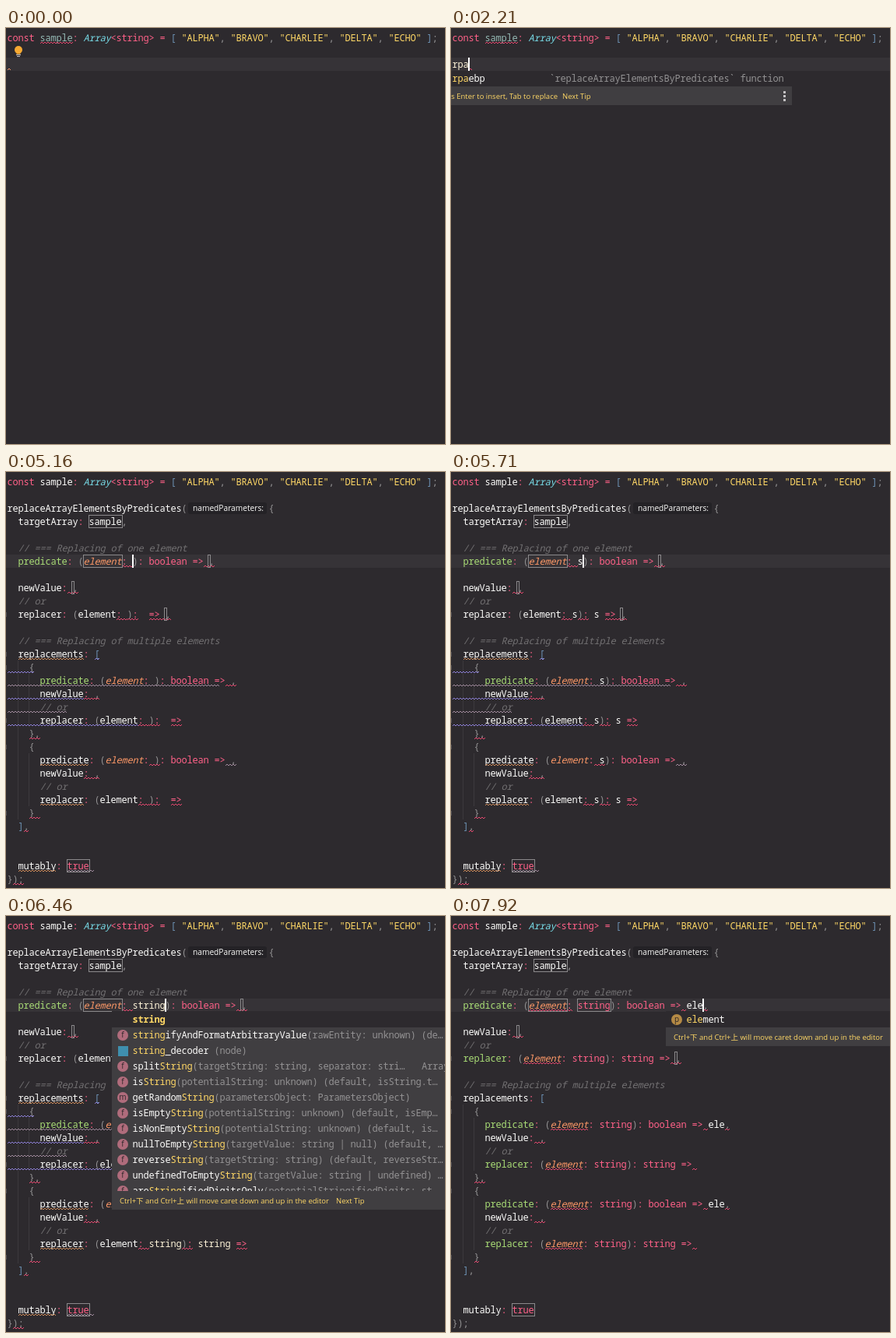
An HTML page with a canvas for the animation above (7.99 s loop, 564 by 534 pixels).

```html
<!DOCTYPE html>
<html lang="en">
<head>
<meta charset="utf-8">
<title>Live template demo</title>
<style>
  html, body { margin: 0; width: 100%; height: 100%; overflow: hidden; background: #2d2a2e; }
  canvas { display: block; }
</style>
</head>
<body>
<canvas id="stage" width="564" height="534"></canvas>
<script>
const LOOP = 7990, CELL = 7, LINE = 17;
const ctx = document.getElementById('stage').getContext('2d');
const MONO = '12px "Noto Sans Mono", "DejaVu Sans Mono", monospace';
const SANS = '"Open Sans", "Noto Sans", "Noto Sans CJK JP", sans-serif';
const HINT = '9.5px ' + SANS;
const C = {
  bg: '#2d2a2e', line: '#363337', panel: '#403e41', white: '#fcfcfa', cream: '#fdf3d8',
  grey: '#939293', comment: '#727072', pink: '#ff6188', yellow: '#ffd866', green: '#a9dc76',
  orange: '#fc9867', cyan: '#78dce8', blue: '#6d92b4', unused: '#94b8b3', box: '#8b898b',
  selection: '#5b595c', guide: '#3c393d', red: '#e8486f', purple: '#8c7fd6', dusk: '#a08a9c', amber: '#cf8d5c'
};

const colX = col => 1 + col * CELL;
const rowY = row => 4 + row * LINE;

function rect(x, y, w, h, color) {
  ctx.fillStyle = color;
  ctx.fillRect(x, y, w, h);
}

function write(text, x, y, color, font = MONO, align = 'left') {
  ctx.font = font;
  ctx.letterSpacing = font.endsWith(MONO) ? '-0.2px' : '0px';
  ctx.textAlign = align;
  ctx.fillStyle = color;
  ctx.fillText(text, x, y);
}

// Draws [text, color] pairs one after another on the monospace grid.
function writeParts(x, y, parts, font = MONO) {
  for (const [text, color] of parts) {
    write(text, x, y, color, font);
    x += text.length * CELL;
  }
}

const writeCode = (text, row, col, color, font) =>
  write(text, colX(col) + .6, rowY(row) + 13, color, font);

// An empty template field still shows as a narrow box.
function box(row, col, length) {
  const x = colX(col) + (length ? .5 : -.5);
  ctx.strokeStyle = C.box;
  ctx.lineWidth = 1;
  ctx.strokeRect(x, rowY(row) + .5, length ? length * CELL + 1 : 3, LINE - 1);
}

function wave(row, from, to, color = C.red) {
  const bottom = rowY(row) + LINE - 1, end = colX(to) + 1;
  ctx.strokeStyle = color;
  ctx.lineWidth = 1;
  ctx.beginPath();
  for (let x = colX(from) + 1, up = 0; x <= end; x += 2, up ^= 1) ctx.lineTo(x, bottom - up * 2);
  ctx.stroke();
}

// Returns [color, italic] of one token.
function tokenStyle(token, row, s) {
  if (token.startsWith('//')) return [C.comment, true];
  if (token[0] === '"') return [C.yellow];
  if (row === 0 && token === 'sample') return [s.analysed ? C.white : C.unused];
  if (token === 'Array') return [C.cyan, true];
  if (token === 'string') return [row === 0 || s.resolved ? C.pink : C.cream];
  if (/^(const|boolean|true|=>|[:<>=])$/.test(token)) return [C.pink];
  if (token === 'predicate' && (s.resolved || s.analysed && row < 20)) return [C.green];
  if (token === 'replacer' && s.resolved) return [C.green];
  if (token === 'element' && (s.resolved || s.analysed && [6, 15, 21].includes(row))) return [C.orange, true];
  if (/^[[\]]$/.test(token)) return [C.blue];
  return [/^\w/.test(token) ? C.white : C.grey];
}

function codeLine(row, text, s) {
  for (const m of text.matchAll(/\/\/.*|"[^"]*"|\w+|=>|\S/g)) {
    const [color, italic] = tokenStyle(m[0], row, s);
    writeCode(m[0], row, m.index, color, (italic ? 'italic ' : '') + MONO);
  }
}

function snippetLines(s) {
  const predicate = `predicate: (element: ${s.type}): boolean => ${s.body},`;
  const replacer = `replacer: (element: ${s.type}): ${s.type} => `;
  const lines = {
    2: 'replaceArrayElementsByPredicates(' + ' '.repeat(s.analysed ? 15 : 0) + '{',
    3: '  targetArray: sample,',
    5: '  // === Replacing of one element',
    6: '  ' + predicate,
    8: '  newValue: ,',
    9: '  // or',
    10: '  ' + replacer + ',',
    12: '  // === Replacing of multiple elements',
    13: '  replacements: [',
    26: '  ],',
    29: '  mutably: true',
    30: '});'
  };
  for (const row of [14, 20]) {
    ['    {', '      ' + predicate, '      newValue: ,', '      // or', '      ' + replacer, row < 20 ? '    },' : '    }']
      .forEach((text, i) => lines[row + i] = text);
  }
  return lines;
}

function firstWarnings(n) {
  wave(6, 21, 23); wave(6, 36 + n, 38 + n);
  wave(8, 11, 13);
  wave(10, 20, 22); wave(10, 22 + n, 24 + n); wave(10, 26 + 2 * n, 30 + 2 * n);
  wave(13, 2, 14, C.amber); wave(13, 16, 17, C.purple);
  wave(14, 0, 5, C.purple);
  wave(15, 0, 39 + n, C.dusk); wave(15, 40 + n, 42 + n);
  wave(16, 0, 14, C.purple); wave(16, 14, 17);
  wave(17, 0, 11, C.dusk);
  wave(18, 0, 24, C.purple); wave(18, 24, 26); wave(18, 26 + n, 28 + n); wave(18, 30 + 2 * n, 32 + 2 * n);
  wave(19, 4, 6);
  wave(21, 6, 15, C.amber); wave(21, 26, 28); wave(21, 40 + n, 42 + n, C.dusk);
  wave(22, 14, 17);
  wave(24, 6, 14, C.amber); wave(24, 24, 26); wave(24, 26 + n, 28 + n); wave(24, 30 + 2 * n, 32 + 2 * n);
  wave(25, 4, 6);
  wave(26, 3, 4);
  wave(29, 2, 9, C.amber); wave(29, 11, 16, C.dusk);
  wave(30, 1, 3);
}

function finalWarnings(b) {
  wave(6, 14, 22); wave(6, 42, 43); wave(6, 43 + b, 44 + b);
  wave(8, 11, 13);
  wave(10, 13, 20); wave(10, 40, 42);
  for (const row of [15, 21]) {
    wave(row, 18, 25); wave(row, 46, 47); wave(row, 47 + b, 48 + b);
    wave(row + 1, 15, 17);
    wave(row + 3, 17, 24); wave(row + 3, 44, 45);
    wave(row + 4, 4, row < 20 ? 6 : 5);
  }
}

function inlayHint() {
  ctx.fillStyle = '#242226';
  ctx.beginPath();
  ctx.roundRect(234, 39, 101, 15, 3);
  ctx.fill();
  write('namedParameters:', 240, 50, C.white, '10.2px ' + SANS);
}

function guides() {
  rect(15, rowY(14), 1, LINE * 12, C.guide);
  for (const row of [15, 21]) rect(29, rowY(row), 1, LINE * 4, C.guide);
  for (const row of [10, 13, 14, 18, 20, 25]) rect(0, rowY(row) + 6, 1, 6, '#514e52');
}

function bulb() {
  ctx.fillStyle = '#f5a932';
  ctx.beginPath();
  ctx.arc(16, 28, 5, 0, 7);
  ctx.fill();
  rect(13.5, 31, 5, 2.5, '#f5a932');
  rect(13, 34, 6, 1, '#c4c2c4');
  rect(14, 36, 4, 1, '#c4c2c4');
}

function badge(x, y, letter, color) {
  ctx.fillStyle = color;
  ctx.beginPath();
  ctx.arc(x, y, 7, 0, 7);
  ctx.fill();
  write(letter, x, y + 3, '#2b2528', '10px ' + SANS, 'center');
}

function hintBar(x, y, w, text, nextX) {
  rect(x, y, w, 24, C.panel);
  write(text, x + 10, y + 16, C.yellow, HINT);
  if (nextX) write('Next Tip', nextX, y + 16, C.yellow, HINT);
}

// Splits a completion into its typed and remaining part.
const completion = (word, typed) => [[typed, C.yellow], [word.slice(typed.length), C.white]];

function templatePopup(typed) {
  rect(0, 55, 438, 20, C.bg);
  writeParts(1.6, 69, completion('rpaebp', typed));
  write('`replaceArrayElementsByPredicates` function', 126.6, 69, C.grey);
  rect(0, 75, 438, 24, C.panel);
  write('Press Enter to insert, Tab to replace', 137, 91, C.yellow, HINT, 'right');
  write('Next Tip', 143, 91, C.yellow, HINT);
  for (const y of [81, 86, 91]) rect(427, y, 3, 3, '#c4c2c4');
}

function keywordRow(typed) {
  rect(136, 122, 428, 21, C.bg);
  writeParts(162.4, 137, completion('string', typed), 'bold ' + MONO);
}

function typePopup(typed) {
  keywordRow(typed);
  hintBar(136, 143, 428, 'Press Ctrl+. to choose the selected (or first) suggestion and insert a dot afterwards', 508);
}

const MOVE_TIP = 'Ctrl+下 and Ctrl+上 will move caret down and up in the editor';

// Each entry: text before the match, match, text after it, signature.
const SUGGESTIONS = [
  ['', 'string', 'ifyAndFormatArbitraryValue', '(rawEntity: unknown) (de…'],
  ['', 'string', '_decoder', ' (node)'],
  ['split', 'String', '', '(targetString: string, separator: stri…'],
  ['is', 'String', '', '(potentialString: unknown) (default, isString.t…'],
  ['getRandom', 'String', '', '(parametersObject: ParametersObject)'],
  ['isEmpty', 'String', '', '(potentialString: unknown) (default, isEmp…'],
  ['isNonEmpty', 'String', '', '(potentialString: unknown) (default, is…'],
  ['nullToEmpty', 'String', '', '(targetValue: string | null) (default, …'],
  ['reverse', 'String', '', '(targetString: string) (default, reverseStr…'],
  ['undefinedToEmpty', 'String', '', '(targetValue: string | undefined) …'],
  ['are', 'String', 'ifiedDigitsOnly', '(potentialStringifiedDigits: st…']
];

function listPopup() {
  rect(136, 122, 428, 255, C.panel);
  keywordRow('string');
  ctx.save();
  ctx.beginPath();
  ctx.rect(136, 123, 428, 230);
  ctx.clip();
  SUGGESTIONS.forEach(([before, match, after, signature], i) => {
    const y = 153 + i * 20;
    if (i === 1) rect(144, y - 6, 13, 13, '#3f8fae');
    else badge(150, y, i === 4 ? 'm' : 'f', '#b06c7c');
    writeParts(162.4, y + 4, [[before, C.white], [match, C.yellow], [after, C.white], [signature, C.grey]]);
  });
  write('Array', 534, 197, C.grey);
  ctx.restore();
  hintBar(136, 353, 428, MOVE_TIP, 424);
}

function elementPopup(typed) {
  rect(276, 122, 288, 21, C.bg);
  badge(290, 133, 'p', '#b58a45');
  writeParts(302.4, 137, completion('element', typed));
  hintBar(276, 143, 288, MOVE_TIP);
}

const typedAt = (word, times, t) => word.slice(0, times.filter(time => t >= time).length);

function caretAt(t, s) {
  if (t < 1820) return null;
  if (t < 2700) return [2, s.trigger.length];
  if (t < 4340) return t < 3890 ? [3, 21] : null;
  if (t < 5160) return [6, 21];
  return [6, t < 7080 ? 23 + s.type.length : 43 + s.body.length];
}

function drawSnippet(t, s) {
  const n = s.type.length, b = s.body.length;
  guides();
  if (t < 4340) rect(colX(15) + 1, rowY(3), 42, LINE, C.selection);
  else if (t < 5160) rect(colX(14) + 1, rowY(6), 49, LINE, C.selection);
  for (const [row, text] of Object.entries(snippetLines(s))) codeLine(+row, text, s);
  if (t < 4340) writeCode('sample', 3, 15, C.yellow);
  if (s.analysed) inlayHint();
  if (s.resolved) finalWarnings(b);
  else if (s.analysed) firstWarnings(n);
  if (t >= 2770) {
    if (t < 4340) box(0, 6, 6);
    box(3, 15, 6);
    box(6, 14, 7);
    if (t < 5160 || t >= 7080) box(6, 23, n);
    if (t < 7080) box(6, 37 + n, 0);
    box(8, 12, 0);
    box(10, 29 + 2 * n, 0);
    box(29, 11, 4);
  }
}

function draw(t) {
  const s = {
    trigger: typedAt('rpa', [1820, 2030, 2140], t),
    type: typedAt('string', [5580, 5790, 6020, 6150, 6220, 6290], t),
    body: typedAt('ele', [7560, 7750, 7850], t),
    analysed: t >= 3140,
    resolved: t >= 6830
  };
  rect(0, 0, 564, 534, C.bg);
  rect(0, rowY(t < 2700 ? 2 : t < 4340 ? 3 : 6), 564, LINE, C.line);
  codeLine(0, 'const sample: Array<string> = [ "ALPHA", "BRAVO", "CHARLIE", "DELTA", "ECHO" ];', s);
  if (t < 3390) wave(0, 6, 12);

  if (t < 840) {
    bulb();
    wave(2, 0, .7, C.orange);
  } else if (t >= 1820 && t < 2700) {
    writeCode(s.trigger, 2, 0, C.cream);
    wave(2, s.trigger.length, s.trigger.length + .8);
    if (t >= 2140) templatePopup(s.trigger);
  } else if (t >= 2700) {
    drawSnippet(t, s);
  }

  if (t >= 5860 && t < 6390) typePopup(s.type);
  else if (t >= 6390 && t < 6530) listPopup();
  else if (t >= 7850) elementPopup(s.body);

  const caret = caretAt(t, s);
  if (caret) rect(colX(caret[1]), rowY(caret[0]), 2, LINE, '#ffffff');
}

const start = performance.now();
function tick() {
  draw((performance.now() - start) % LOOP);
  requestAnimationFrame(tick);
}
tick();
</script>
</body>
</html>
```
